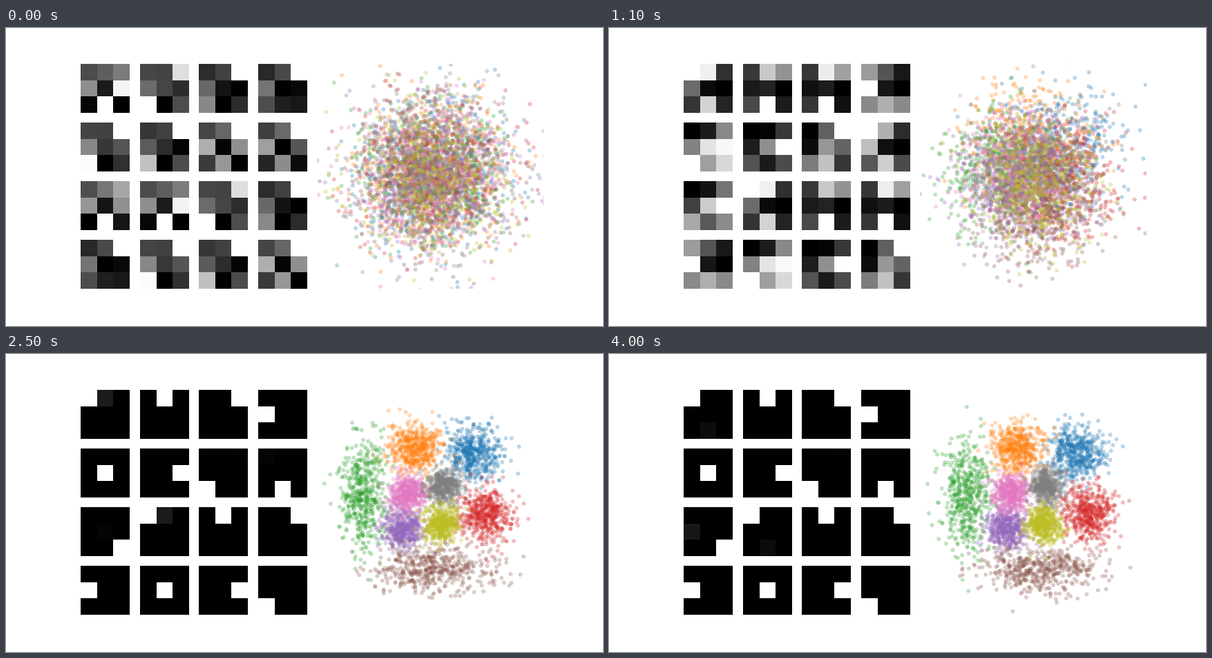
These frames come from a looping animation (864x432 px, 4100 ms). A matplotlib script:

```python
import numpy as np
import matplotlib.pyplot as plt
from matplotlib.animation import FuncAnimation

W, H = 864, 432
FRAMES, STEP_MS = 41, 100
CLASSES, POINTS = 9, 500

# All clouds start as one blob and settle around these centres (pixels)
HOME, HOME_SPREAD = np.array([615, 210]), 53
CENTRES = np.array([(677, 144), (592, 138), (518, 204), (694, 231), (575, 253),
                    (623, 313), (581, 202), (633, 192), (630, 246)])
GREEN, BROWN = 2, 5

# Clouds far from the middle end up wider; two of them also grow long
distance = np.hypot(*(CENTRES - HOME).T)
SPREAD = np.clip(distance / 4, 13, 20)[:, None]
STRETCH = np.ones((CLASSES, 2))
STRETCH[GREEN] = 0.85, 2
STRETCH[BROWN] = 2.15, 0.85

# Training progress at a few key frames
KEYS = [0, 7, 14, 18, 25]
PULL = [0, 0.15, 0.85, 1, 1]
BLUR = [1, 0.93, 0.55, 0.2, 0]
GROWTH = [0, 0, 0, 0.1, 1]

# Weights of the untrained decoder
weights = np.random.default_rng(4)
BIAS = weights.normal(0, 0.2, CLASSES)
SLOPE = weights.normal(0, 0.3, (2, CLASSES))


def clouds(t):
    """Mean and spread of every cloud, each of shape (CLASSES, 2)."""
    pull, blur, growth = (np.interp(t, KEYS, k) for k in (PULL, BLUR, GROWTH))
    mean = HOME + pull * (CENTRES - HOME)
    spread = blur * HOME_SPREAD + (1 - blur) * SPREAD * STRETCH ** growth
    return mean, spread


def decode(z, mean, spread):
    """Grey levels of the 3x3 output for each latent point in z."""
    offset = (z[:, None] - mean) / spread
    fit = -0.5 * (offset ** 2).sum(axis=2) - np.log(spread).sum(axis=1)
    untrained = BIAS + (z - HOME) / HOME_SPREAD @ SLOPE
    logits = fit + untrained
    levels = np.exp(logits - logits.max(axis=1, keepdims=True))
    low = levels.min(axis=1, keepdims=True)
    return (levels - low) / (1 - low)


def state(t):
    """Cloud points and tile levels at step t."""
    rng = np.random.default_rng(100 + t)
    mean, spread = clouds(t)
    noise = rng.standard_normal((CLASSES, POINTS, 2))
    points = mean[:, None] + spread[:, None] * noise
    samples = mean + 0.6 * spread * noise[:, 0]
    return points.reshape(-1, 2), decode(samples, mean, spread)


def pixel_axes(x0, y0, x1, y1):
    ax = fig.add_axes([x0 / W, 1 - y1 / H, (x1 - x0) / W, (y1 - y0) / H])
    ax.axis("off")
    return ax


fig = plt.figure(figsize=(W / 72, H / 72), dpi=72, facecolor="white")

tiles = []
for n in range(16):
    row, col = divmod(n, 4)
    x, y = round(108 + 85.6 * col), 52 + 85 * row
    ax = pixel_axes(x, y, x + 71, y + 71)
    tiles.append(ax.imshow(np.zeros((3, 3)), cmap="gray", vmin=0, vmax=1,
                           interpolation="nearest", aspect="auto"))

plot = pixel_axes(450, 52, 778, 378)
colors = np.repeat(plt.get_cmap("tab10").colors[:CLASSES], POINTS, axis=0)
dots = plot.scatter(*state(0)[0].T, s=36, c=colors, alpha=0.3, linewidths=0)
plot.set_xlim(450, 778)
plot.set_ylim(378, 52)


def update(t):
    points, levels = state(t)
    dots.set_offsets(points)
    for n, tile in enumerate(tiles):
        tile.set_data(levels[n % CLASSES].reshape(3, 3))
    return [*tiles, dots]


anim = FuncAnimation(fig, update, frames=FRAMES, interval=STEP_MS,
                     repeat=True, repeat_delay=0)
plt.show()
```
